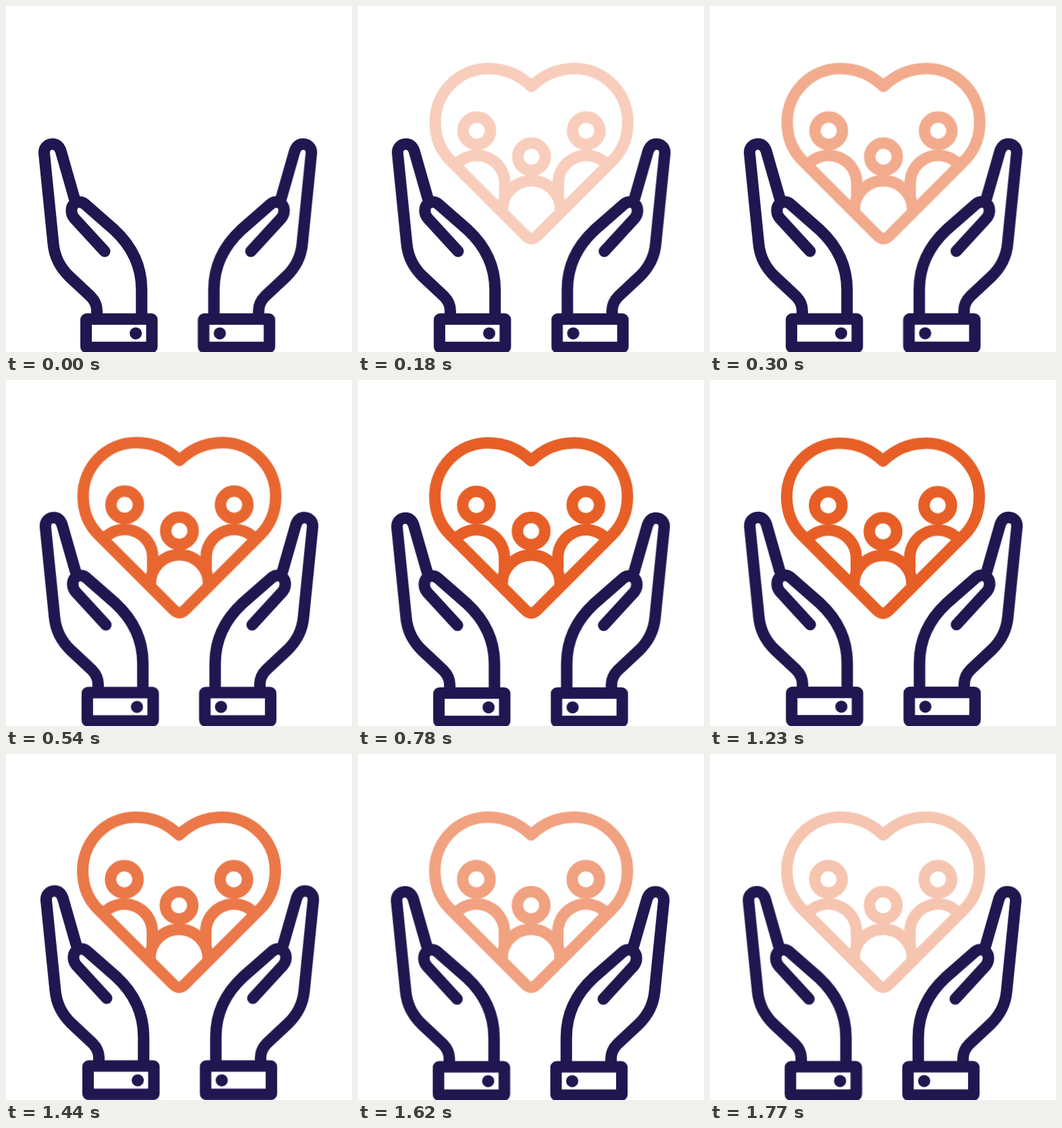
Recreate the animation shown at these times as an HTML page. Size 512 px wide and 512 px high, loop 1800 ms.

```html
<!DOCTYPE html>
<html lang="en">
<head>
<meta charset="utf-8">
<title>Caring hands</title>
<style>
  html, body { margin: 0; width: 100%; height: 100%; overflow: hidden; background: #fff; }
  svg { display: block; width: 100%; height: 100%; }

  .line { fill: none; stroke-width: 17; stroke-linejoin: round; }
  .hands { stroke: #211650; stroke-linecap: round; animation: sway 1800ms ease-in-out infinite; }
  .button { fill: #211650; stroke: none; }
  .heart {
    stroke: #e75f26;
    animation: fade 1800ms linear infinite, drift 1800ms linear infinite;
  }

  @keyframes sway {
    0%, 3.32% { transform: translate(0, 0); }
    10% { transform: translate(2.1px, 0); }
    30% { transform: translate(1.8px, -.7px); }
    43.33% { transform: translate(1.2px, 0); }
    60% { transform: translate(2px, -.7px); }
    80% { transform: translate(2.9px, -1.6px); }
    83% { transform: translate(3.1px, -1.5px); }
    92% { transform: translate(.3px, -.3px); }
    98.33%, 100% { transform: translate(.5px, -.5px); }
  }

  /* Hidden for the first 60 ms, then fades up; the fade-out is cut by the loop. */
  @keyframes fade {
    0%, 3.32% { opacity: 0; }
    3.33% { opacity: .1; }
    31.67% { opacity: 1; }
    74% { opacity: 1; }
    100% { opacity: .32; }
  }

  @keyframes drift {
    0%, 10% { transform: translate(.7px, -.5px); }
    30% { transform: translate(.6px, -.4px); }
    43.33% { transform: translate(.2px, 0); }
    60%, 80% { transform: translate(0, .5px); }
    100% { transform: translate(.3px, .3px); }
  }
</style>
</head>
<body>
<svg viewBox="0 0 512 512">
  <defs>
    <g id="hand">
      <path d="M101 284 L81 214 C78 207 74.500 204.300 69 204.300 C61 204.300 56 210 56.500 218 L70 352 C72 373 81 388 94 400.500 L125 429.500 C131.500 436 134.500 443 134.500 451 V462"/>
      <path d="M146 363 L101 314 C95.500 307 95.500 298 101 292.500 C107 287.500 114 290 120 296 L160 331 C187 356 200.700 385 200.700 420 V462"/>
      <rect x="118.500" y="463.300" width="97.400" height="42" rx="1"/>
      <circle class="button" cx="192" cy="484.400" r="9"/>
    </g>
  </defs>

  <g class="line heart">
    <path d="M256 119.500 C238 102 216 93 192 93 C148 93 113.500 129 113.500 172 C113.500 194 121 214 136 229 L247 340 Q256 349.500 265 340 L376 229 C391 214 398.500 194 398.500 172 C398.500 129 364 93 320 93 C296 93 274 102 256 119.500 Z"/>
    <circle cx="175" cy="185" r="20.300"/>
    <circle cx="337" cy="185" r="20.300"/>
    <circle cx="256" cy="223.500" r="20.300"/>
    <path d="M144 235.400 A41.500 41.500 0 0 1 216.500 263 V286"/>
    <path d="M368 235.400 A41.500 41.500 0 0 0 295.500 263 V286"/>
    <path d="M213 304 V302 A43 43 0 0 1 299 302 V304"/>
  </g>

  <g class="line hands">
    <use href="#hand"/>
    <use href="#hand" transform="translate(508.400 0) scale(-1 1)"/>
  </g>
</svg>
</body>
</html>
```
